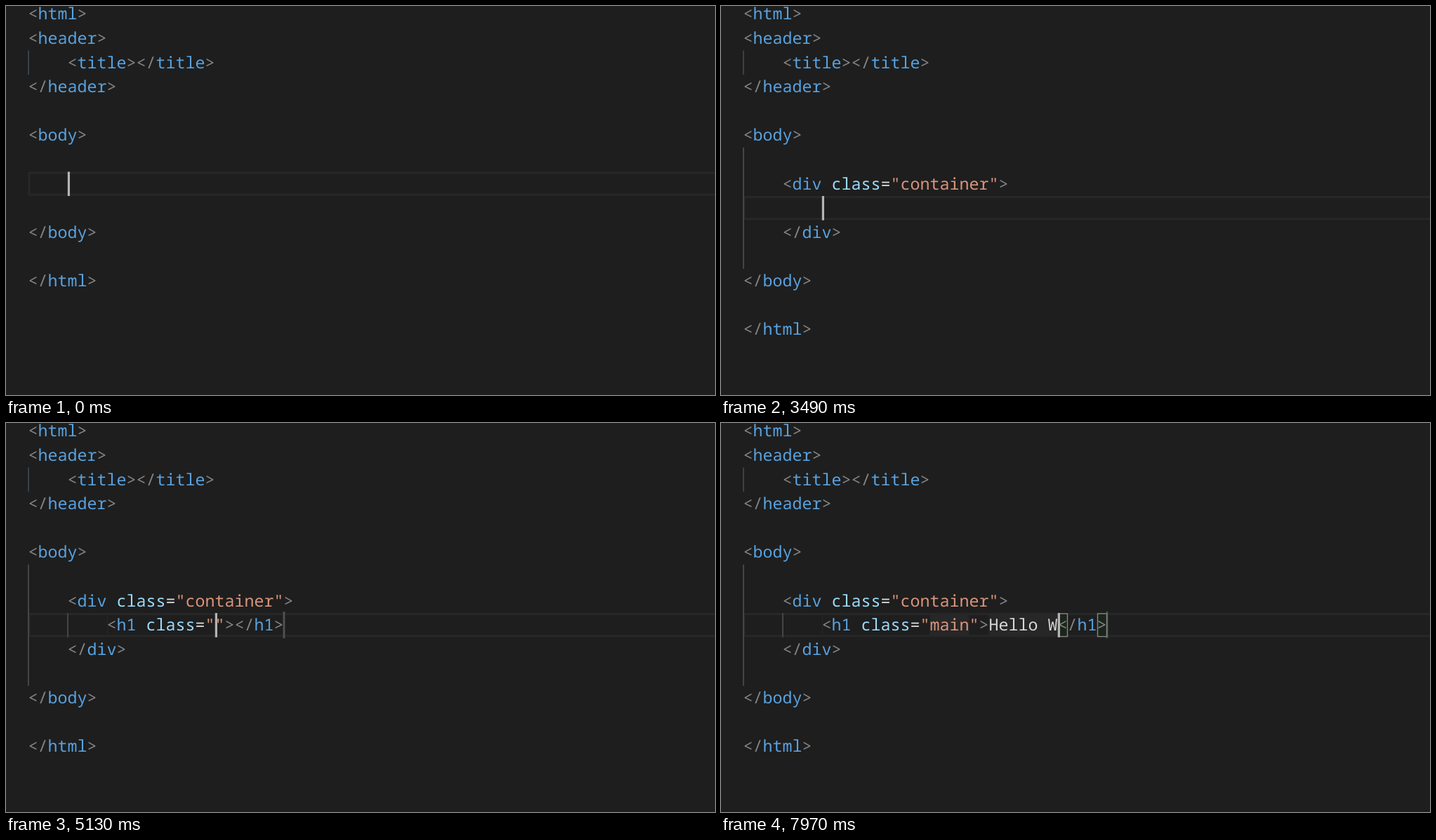
Animation, 1010 px wide and 555 px high, one loop 8 s. Source, as an HTML page:

```html
<!DOCTYPE html>
<html lang="en">
<head>
<meta charset="utf-8">
<title>Typing HTML with class snippets</title>
<style>
  html, body { margin: 0; width: 100%; height: 100%; overflow: hidden; background: #1e1e1e; }
  svg { display: block; }
  text {
    font: 23.333px "Noto Sans Mono", "DejaVu Sans Mono", monospace;
    font-variant-ligatures: none;
    text-rendering: geometricPrecision;
    white-space: pre;
    fill: #d8d8d8;
  }
  .punct { fill: #848484; }
  .tag { fill: #58a2e0; }
  .attr { fill: #9cdcfe; }
  .str { fill: #db947c; }
  .hit { fill: #0f97f5; font-weight: 700; }
  .origin { fill: #94a8b5; }
  .line { fill: none; stroke: #282828; stroke-width: 2.8; }
  .guide { fill: #454545; }
  .title-guide { fill: #36414a; }
  .range { fill: none; stroke: #262626; }
  .field { fill: #272727; }
  .stop { fill: #525252; }
  .bracket { fill: #1b251b; stroke: #858585; stroke-width: 1.4; }
  .caret { fill: #b4b4b2; }
  .menu { fill: #252526; }
  .chosen { fill: #073655; }
  .frame { fill: none; stroke: #454545; stroke-width: 1.5; }
  .icon { fill: none; stroke: #c8c8c8; stroke-width: 2; }
  .icon-back { fill: #252526; }
  .dots { stroke-dasharray: 2.2 2.2; }
  .info { fill: #1878ae; }
  .info-mark { fill: #a5cbe0; }
</style>
</head>
<body>
<svg id="stage" width="1010" height="555" viewBox="0 0 1010 555"></svg>
<script>
const LOOP = 8000, CELL = 14, LINE = 34.6, MENU_W = 782.5;
const X = col => 31.5 + col * CELL;
const Y = row => -5.7 + row * LINE;
const stage = document.getElementById('stage');

// ---- timeline: every step changes part of the one before ----
const steps = [];
let last = { a: '', b: '', row: 7, col: 4, caret: true, open: false };
const add = (at, change) => steps.push(last = { ...last, caret: true, menu: null, ...change, at });

const names = list => list.split(' ').map(n => n + '.class');
const D_TAGS = names('div dd dl dt');
const H_TAGS = names('h1 h2 h3 h4 h5 h6 header hr');

// An abbreviation typed on line "a" or "b", with its suggestions
function abbr(at, line, text, items, lag = 0) {
  const col = (line === 'a' ? 4 : 8) + text.length;
  add(at, { [line]: text, col, menu: { items, hit: text.length - lag, col: col - lag } });
}

function divClass(at, name) {
  add(at, {
    a: `<div class="${name}">`, open: true, col: 16 + name.length,
    field: [7, 16, name.length], stop: [8, 8]
  });
}

function heading(at, name, text, inText, extra) {
  const open = `<h1 class="${name}">`;
  const b = open + text + '</h1>';
  add(at, {
    b, col: inText ? 8 + open.length + text.length : 19 + name.length,
    main: name.length, inText,
    field: inText ? [8, 8 + open.length, text.length] : null,
    stop: [8, 8 + b.length], ...extra
  });
}

function greet(at, text, items) {
  const col = 25 + text.length;
  heading(at, 'main', text, true, items && { menu: { items, hit: text.length, col } });
}

add(0, {});
add(100, { caret: false });
abbr(430, 'a', 'd', D_TAGS);
const div = ['div.class'], h1 = ['h1.class'];
abbr(670, 'a', 'di', div);
abbr(770, 'a', 'div', div);
abbr(890, 'a', 'div.', div);
abbr(1100, 'a', 'div.c', div);
abbr(1210, 'a', 'div.cl', div);
abbr(1320, 'a', 'div.cla', div, 1);
abbr(1440, 'a', 'div.cla', div);

divClass(1650, '');
const wordTimes = { 2210: 1, 2300: 2, 2400: 3, 2640: 4, 2730: 5, 2950: 7, 3050: 8, 3160: 9 };
for (const at in wordTimes) divClass(+at, 'container'.slice(0, wordTimes[at]));

add(3490, { row: 8, col: 8, field: null, stop: null });
abbr(4040, 'b', 'h', H_TAGS);
abbr(4350, 'b', 'h1', h1);
abbr(4470, 'b', 'h1.', h1);
abbr(4580, 'b', 'h1.c', h1);
abbr(4690, 'b', 'h1.cl', h1);
abbr(4800, 'b', 'h1.cla', h1, 1);
abbr(4910, 'b', 'h1.cla', h1);

heading(5130, '', '', false);
heading(5570, '', '', false, { caret: false });
[6020, 6120, 6230, 6330, 6440].forEach((at, i) => heading(at, 'main'.slice(0, i), '', false));

greet(6550, '');
greet(6980, 'H', H_TAGS);
greet(7200, 'He', ['header.class']);
greet(7310, 'Hel');
greet(7410, 'Hell');
greet(7630, 'Hello');
greet(7750, 'Hello ');
greet(7970, 'Hello W');

// ---- drawing ----
const esc = s => s.replace(/</g, '&lt;').replace(/>/g, '&gt;');
const span = (cls, s) => `<tspan class="${cls}">${esc(s)}</tspan>`;
const rect = (cls, x, y, w, h) => `<rect class="${cls}" x="${x}" y="${y}" width="${w}" height="${h}"/>`;
const label = (x, y, body, cls = '') => `<text class="${cls}" x="${x}" y="${Math.floor(y)}">${body}</text>`;

function colour(code) {
  let inTag = false, named = false;
  return code.replace(/<\/?|>|"[^"]*"|\w+|[^]/g, part => {
    if (part[0] === '<') { inTag = true; named = false; return span('punct', part); }
    if (part === '>') { inTag = false; return span('punct', part); }
    if (!inTag) return part;
    if (part[0] === '"') return span('str', part);
    if (!/\w/.test(part)) return part;
    const cls = named ? 'attr' : 'tag';
    named = true;
    return span(cls, part);
  });
}

function codeLine(text, row) {
  const body = text.trimStart();
  return body && label(X(text.length - body.length), Y(row) + 25.6, colour(body));
}

function drawMenu({ items, hit, col }, row) {
  const x = X(col), top = Math.round(Y(row + 1)), h = Math.floor(items.length * LINE);
  let out = rect('menu', x, top, MENU_W, h) + rect('chosen', x, top, MENU_W, 34);
  items.forEach((item, i) => {
    const y = top + i * LINE;
    out += rect('icon-back', x + 8.5, y + 7.5, 20.5, 22.3)
      + `<path class="icon" d="M${x + 9.5} ${y + 25.5}v-17h18.5v17"/>`
      + `<path class="icon dots" d="M${x + 8.5} ${y + 28.8}h20.5"/>`
      + label(x + 40, y + 27, span('hit', item.slice(0, hit)) + item.slice(hit));
  });
  out += label(x + 560.2, top + 27, 'HTML-Classes', 'origin')
    + `<circle class="info" cx="${x + 745.3}" cy="${top + 18.8}" r="10.5"/>`
    + rect('info-mark', x + 744.1, top + 12, 2.4, 2.6)
    + rect('info-mark', x + 744.1, top + 16.5, 2.4, 9);
  return out + rect('frame', x + 0.5, top + 0.5, MENU_W - 1, h - 1);
}

function draw(s) {
  const lines = ['<html>', '<header>', '    <title></title>', '</header>', '', '<body>', '',
    '    ' + s.a, '        ' + s.b, ...(s.open ? ['    </div>', ''] : []), '</body>', '', '</html>'];
  const guide = (cls, col, from, to) => rect(cls, X(col) - 0.5, Y(from), 2, (to - from) * LINE);
  let out = rect('line', 33, Y(s.row) + 1.5, 1000, LINE - 3.4);

  if (s.b) out += rect('range', X(8) + 1, Y(8) + 0.9, s.b.length * CELL - 1, LINE - 2);
  if (s.main) out += rect('field', X(19), Y(8), s.main * CELL, LINE - 1);
  if (s.field) out += rect('field', X(s.field[1]), Y(s.field[0]), s.field[2] * CELL, LINE - 1);

  out += guide('title-guide', 0, 2, 3);
  if (s.a) out += guide('guide', 0, 6, s.open ? 11 : 9);
  if (s.b) out += guide('guide', 4, 8, 9);

  if (s.stop) out += rect('stop', X(s.stop[1]) - 0.9, Y(s.stop[0]) - 2, 2.8, LINE + 3.4);
  if (s.inText) {
    for (const col of [s.col, s.col + 4]) {
      out += rect('bracket', X(col) + 1, Y(8) + 0.9, CELL - 1, LINE - 2);
    }
  }
  out += lines.map(codeLine).join('');
  if (s.caret) out += rect('caret', X(s.col) + 0.3, Y(s.row), 3.2, LINE);
  if (s.menu) out += drawMenu(s.menu, s.row);
  stage.innerHTML = out;
}

let shown;
function tick() {
  const t = performance.now() % LOOP;
  const now = steps.findLast(s => s.at <= t);
  if (now !== shown) draw(shown = now);
  requestAnimationFrame(tick);
}
tick();
</script>
</body>
</html>
```
